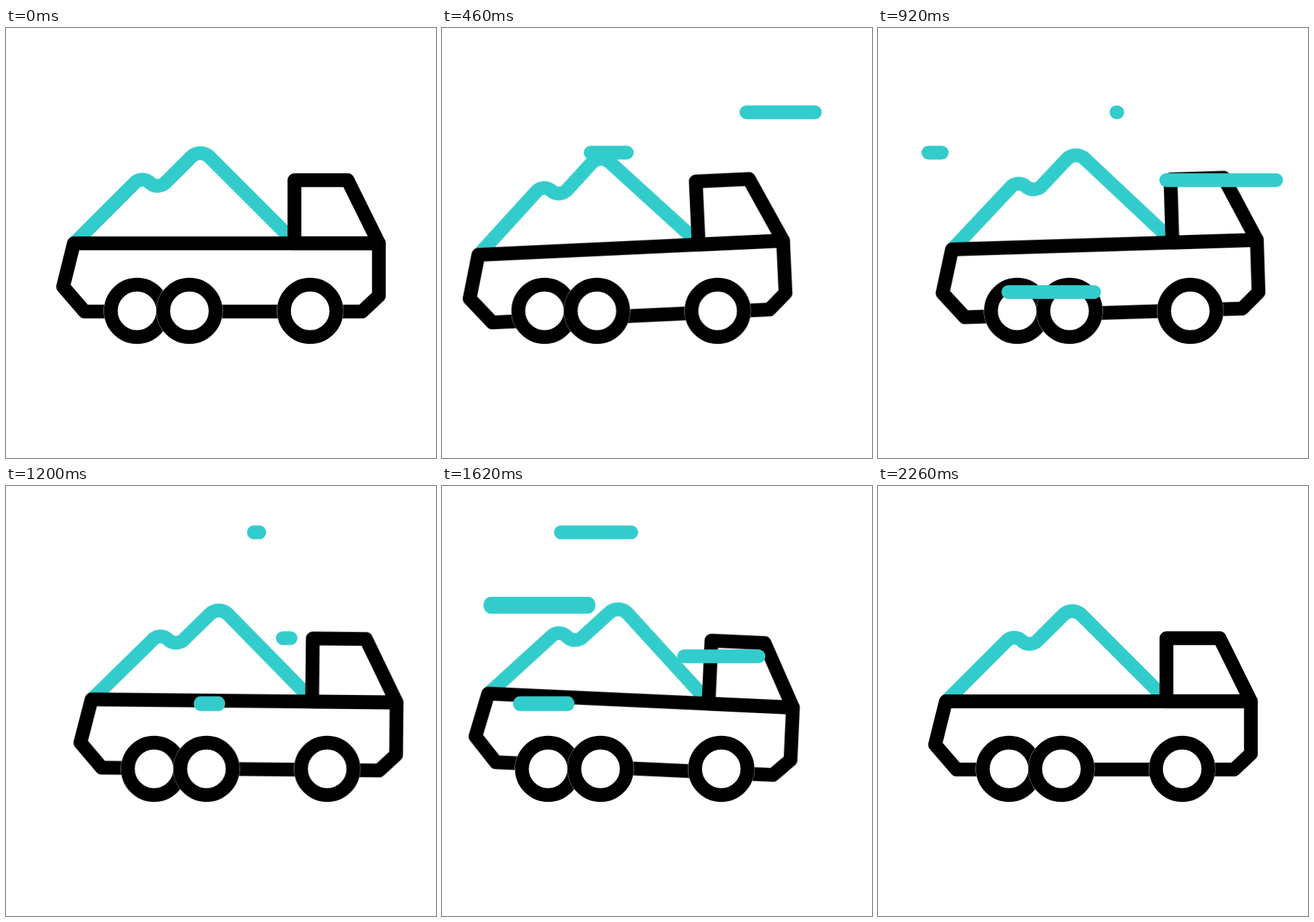
An HTML page without scripts for the animation above (2.4 s loop, 640x640 px).

```html
<!DOCTYPE html>
<html lang="en">
<head>
<meta charset="utf-8">
<title>Loaded truck</title>
<style>
  @property --head { syntax: "<number>"; inherits: false; initial-value: 0; }
  @property --tail { syntax: "<number>"; inherits: false; initial-value: 0; }

  html, body { margin: 0; width: 100%; height: 100%; overflow: hidden; background: #fff; }
  svg { display: block; width: 100%; height: 100%; }

  .ink, .load, .streak { fill: none; stroke-width: 20.5; stroke-linecap: round; stroke-linejoin: round; }
  .ink { stroke: #000; }
  .load, .streak { stroke: #3cc; }

  .drive, .bob, .tilt {
    animation: 2400ms cubic-bezier(.37, 0, .63, 1) infinite;
    transform-origin: 370px 421px;
  }
  .drive { animation-name: drive; }
  .bob { animation-name: bob; }
  .tilt { animation-name: tilt; }

  @keyframes drive {
    0%, .4% { transform: translateX(0); }
    23.33% { transform: translateX(-46px); }
    45.83% { transform: translateX(31px); }
    68.33% { transform: translateX(-37.3px); }
    90%, 100% { transform: translateX(0); }
  }
  @keyframes bob {
    0% { transform: translateY(0); }
    14.17% { transform: translateY(5.9px); }
    27.5% { transform: translateY(1.3px); }
    50% { transform: translateY(-.2px); }
    67.5% { transform: translateY(.7px); }
    80% { transform: translateY(-5.8px); }
    94.17%, 100% { transform: translateY(0); }
  }
  @keyframes tilt {
    0% { transform: rotate(0deg); }
    25% { transform: rotate(-3.05deg); }
    67.5% { transform: rotate(2.62deg); }
    90%, 100% { transform: rotate(0deg); }
  }

  /* The head of each streak runs ahead, the tail catches up. */
  .streak {
    visibility: hidden;
    stroke-dasharray: calc((var(--head) - var(--tail)) * 1px + .01px) 400px;
    stroke-dashoffset: calc(var(--tail) * -1px);
    animation: head 2400ms cubic-bezier(.37, 0, .63, 1) var(--at) infinite,
               tail 2400ms cubic-bezier(.37, 0, .63, 1) var(--at) infinite,
               show 2400ms step-end var(--at) infinite;
  }
  @keyframes head {
    0% { --head: 0; }
    18.2%, 100% { --head: 200; }
  }
  @keyframes tail {
    0%, 11.04% { --tail: 0; }
    29.25%, 100% { --tail: 200; }
  }
  @keyframes show {
    0% { visibility: visible; }
    29.25%, 100% { visibility: hidden; }
  }
</style>
</head>
<body>
<svg viewBox="0 0 640 640">
  <defs>
    <g id="wheel">
      <circle r="49.6" fill="#fff"/>
      <circle class="ink" r="39"/>
    </g>
  </defs>

  <g class="drive">
    <g class="bob">
      <g class="tilt">
        <path class="load" d="M102 320L192.6 229.4A16 16 0 0 1 213 229.4A17 17 0 0 0 239 228.5L275.6 191.9A19.3 19.3 0 0 1 302.9 191.9L429 318"/>
        <path class="ink" d="M101 320.5H555V398.5L530 422H117L85 385Z"/>
        <path class="ink" d="M429.3 320.5V226.5H508.500L555 320.5Z"/>
      </g>
    </g>
    <use href="#wheel" x="195" y="421"/>
    <use href="#wheel" x="273" y="421"/>
    <use href="#wheel" x="452.7" y="421"/>
  </g>

  <path class="streak" style="--at:240ms" d="M555 125.500h-200"/>
  <path class="streak" style="--at:309ms" d="M275 185.500h-200"/>
  <path class="streak" style="--at:476ms" d="M394 393h-200"/>
  <path class="streak" style="--at:567ms" d="M612 226.500h-200"/>
  <path class="streak" style="--at:1097ms" transform="translate(316 324) scale(1 1.07)" d="M0 0h-200"/>
  <path class="streak" style="--at:1144ms" d="M377 69h-200"/>
  <path class="streak" style="--at:1205ms" transform="translate(271 177.300) scale(1 1.22)" d="M0 0h-200"/>
  <path class="streak" style="--at:1388ms" d="M471 253.500h-200"/>
</svg>
</body>
</html>
```
